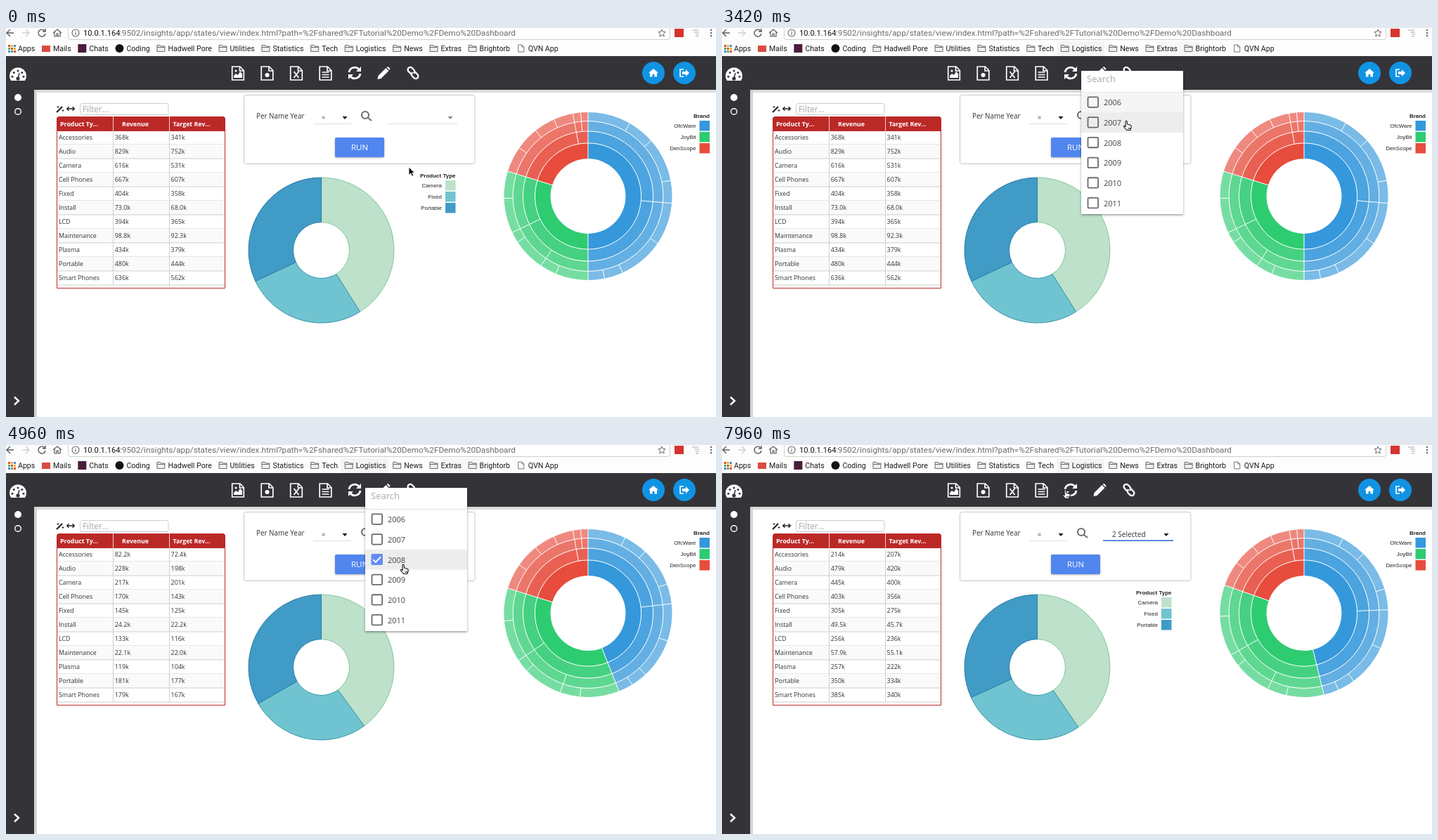
Recreate the animation shown at these times as an HTML page with a canvas. Size 1010 by 554 pixels, loop 8000 ms.

```html
<!DOCTYPE html>
<html lang="en">
<head>
<meta charset="utf-8">
<title>Dashboard filter</title>
<style>
  html, body { margin: 0; width: 100%; height: 100%; overflow: hidden; background: #fff; }
  canvas { display: block; }
</style>
</head>
<body>
<canvas id="stage" width="1010" height="554"></canvas>
<script>
const ctx = document.getElementById('stage').getContext('2d');
const LOOP = 8000, STEP = 150, TAU = Math.PI * 2, DARK = '#343338';
const OPEN = '"Open Sans", sans-serif', ROBOTO = 'Roboto, sans-serif', ARIAL = '"Liberation Sans", sans-serif';

// Moments of the session, in ms
const HOVER_FIELD = 2700, OPENED = 3100, CLOSED = 6850;
const CLICKS = [
  { row: 2, press: 4150, load: 4290, show: 4450 },
  { row: 3, press: 5405, load: 5545, show: 5700 }
];

// Places where the pointer rests
const RESTS = [
  { from: 0, to: 150, x: 573, y: 198 },
  { from: 1070, to: 1200, x: 528, y: 28 },
  { from: 1950, to: 1950, x: 668, y: 30 },
  { from: 2700, to: 3560, x: 574, y: 132 },
  { from: 4050, to: 4950, x: 564, y: 170 },
  { from: 5400, to: 5700, x: 563, y: 192 },
  { from: 6300, to: 6620, x: 607, y: 323 },
  { from: 7500, to: 7650, x: 545, y: 189 },
  { from: 7950, to: LOOP, x: 487, y: 63 }
];

const words = s => s.split(' ');
const PRODUCTS = 'Accessories,Audio,Camera,Cell Phones,Fixed,Install,LCD,Maintenance,Plasma,Portable,Smart Phones'.split(',');
const DATA = [
  {
    revenue: words('368k 829k 616k 667k 404k 73.0k 394k 98.8k 434k 480k 636k'),
    goal: words('341k 752k 531k 607k 358k 68.0k 365k 92.3k 379k 444k 562k'),
    brandEnds: [0.5, 0.798, 1]
  }, {
    revenue: words('82.2k 228k 217k 170k 145k 24.2k 133k 22.1k 119k 181k 179k'),
    goal: words('72.4k 198k 201k 143k 125k 22.2k 116k 22.0k 104k 177k 167k'),
    brandEnds: [0.44, 0.798, 1]
  }, {
    revenue: words('214k 479k 445k 403k 305k 49.5k 256k 57.9k 257k 350k 385k'),
    goal: words('207k 420k 400k 356k 275k 45.7k 236k 55.1k 222k 334k 340k'),
    brandEnds: [0.462, 0.804, 1]
  }
];

const TYPES = [['Camera', '#bde1ca', '#82c69c'], ['Fixed', '#70c4d1', '#3594a8'], ['Portable', '#409bc6', '#2a7ba3']];
// Each brand is cut at these parts of its arc, one list per outer ring
const BRANDS = [
  ['OfcWare', '#3498db', [[0.527], [], [0.165, 0.27, 0.44, 0.69, 0.865, 0.937]]],
  ['JoyBit', '#2ecc71', [[0.6], [0.318], [0.21, 0.53, 0.825]]],
  ['DenScope', '#e74c3c', [[0.857], [0.93], [0.245, 0.47, 0.67]]]
];

function text(s, x, y, font, color, align = 'left') {
  ctx.font = font;
  ctx.fillStyle = color;
  ctx.textAlign = align;
  ctx.fillText(s, x, y);
}
function rect(x, y, w, h, color) {
  ctx.fillStyle = color;
  ctx.fillRect(x, y, w, h);
}
function round(x, y, w, h, r, fill, stroke, width = 1) {
  ctx.beginPath();
  ctx.roundRect(x, y, w, h, r);
  if (fill) { ctx.fillStyle = fill; ctx.fill(); }
  if (stroke) { ctx.strokeStyle = stroke; ctx.lineWidth = width; ctx.stroke(); }
}
function dot(x, y, r, color) {
  ctx.fillStyle = color;
  ctx.beginPath();
  ctx.arc(x, y, r, 0, TAU);
  ctx.fill();
}
// Path placed at x, y: filled, and stroked when a width is given
function icon(x, y, path, fill, stroke, width = 0, turn = 0) {
  const p = new Path2D(path);
  ctx.save();
  ctx.translate(x, y);
  ctx.rotate(turn);
  if (fill) { ctx.fillStyle = fill; ctx.fill(p); }
  if (width) { ctx.strokeStyle = stroke; ctx.lineWidth = width; ctx.stroke(p); }
  ctx.restore();
}
const line = (x, y, path, color, width, turn) => icon(x, y, path, null, color, width, turn);
const shadow = (color, blur, dy) => Object.assign(ctx, { shadowColor: color, shadowBlur: blur, shadowOffsetY: dy });

// Angles of both charts run clockwise from the top, as parts of a turn
const angle = part => (part - 0.25) * TAU;
function sector(cx, cy, r0, r1, from, to) {
  ctx.beginPath();
  ctx.arc(cx, cy, r1, angle(from), angle(to));
  ctx.arc(cx, cy, r0, angle(to), angle(from), true);
  ctx.closePath();
}

function pointerAt(t) {
  const now = Math.floor(t / STEP) * STEP;
  const i = RESTS.findLastIndex(r => r.from <= now);
  const a = RESTS[i], b = RESTS[i + 1] || a;
  const p = Math.max(0, (now - a.to) / (b.from - a.to || 1));
  const eased = a === b ? 0 : p * p * (3 - 2 * p);
  return { x: a.x + (b.x - a.x) * eased, y: a.y + (b.y - a.y) * eased };
}

function bookmarks() {
  const tiles = ['#e04a3f', '#4caf50', '#4285f4', '#f4b400'];
  for (let i = 0; i < 9; i++) rect(3 + i % 3 * 4, 24 + Math.floor(i / 3) * 4, 3, 3, tiles[i * 3 % 4]);
  const folder = x => icon(x, 29, 'M-5.5-4.5H-1L0-3H5.5V4.5H-5.5ZM-5.5-1.5H5.5', '#eee', '#6a6a6a', 1);
  const marks = {
    Apps: () => {},
    Mails: x => rect(x - 6, 25, 12, 9, '#d94b40'),
    Chats: x => rect(x - 6, 23, 12, 12, '#4a1d3a'),
    Coding: x => dot(x, 29, 6, '#111'),
    'Hadwell Pore': folder, Utilities: folder, Statistics: folder, Tech: folder,
    Logistics: folder, News: folder, Extras: folder, Brightorb: folder,
    'QVN App': x => line(x, 29, 'M-4-5H1L4-2V5H-4ZM1-5V-2H4', '#777', 1)
  };
  let x = 17;
  for (const [name, mark] of Object.entries(marks)) {
    mark(x - 10);
    text(name, x, 33, '10.6px ' + ROBOTO, '#1c1c1c');
    x += ctx.measureText(name).width + 25.7;
  }
}

function browserBar(t) {
  rect(0, 0, 1010, 40, '#fdfdfd');
  if (t >= 1070) rect(476, 19, 68, 21, '#f4f4f4');
  if (t >= 1950) rect(620, 19, 60, 21, '#f7f7f7');
  line(6, 7, 'M5 0H-4M0-5L-5 0 0 5', '#5a5a5a', 1.4);
  line(28, 7, 'M-5 0H4M0-5L5 0 0 5', '#d0d0d0', 1.4);
  line(51, 7, 'M4-3A5 5 0 1 0 5 1M5-6V-2H1', '#5a5a5a', 1.4);
  line(73, 7, 'M-6 0L0-5 6 0M-4-1V5H-1V1H1V5H4V-1', '#5a5a5a', 1.2);
  round(88.5, -8, 856, 24.5, 3, '#fff', '#cfcfcf');
  line(99, 7, 'M5 0A5 5 0 1 1-5 0A5 5 0 1 1 5 0M0-1V3M0-3V-2', '#666', 1.1);
  text('10.0.1.164', 110, 11, '11.1px ' + ROBOTO, '#111');
  text(':9502/insights/app/states/view/index.html?path=%2Fshared%2FTutorial%20Demo%2FDemo%20Dashboard',
    162, 11, '11.75px ' + ROBOTO, '#6a6a6a');
  line(933, 7, 'M0-5L1.5-1.6 5-1.3 2.4 1.2 3.2 5 0 3-3.2 5-2.4 1.2-5-1.3-1.5-1.6Z', '#666', 1);
  rect(951, 1, 13, 12, '#d6322f');
  line(981, 7, 'M-5-4H4M-2-1H5M0 2H5M0 5H4', '#aaa', 1);
  for (let y = 3; y < 12; y += 4) dot(1003, y, 1.2, '#666');
  bookmarks();
}

function appFrame() {
  rect(40, 88, 970, 4, '#dcdcdc');
  rect(40, 88, 4, 466, '#d4d4d4');
  rect(0, 40, 1010, 48, DARK);
  rect(0, 40, 40, 514, DARK);
  icon(17, 66, 'M-10 9A12 12 0 1 1 10 9Z', '#fff');
  for (let i = -2; i <= 2; i++) dot(17 + 8 * Math.sin(i * 0.8), 69 - 8 * Math.cos(i * 0.8), 1.5, DARK);
  line(17, 66, 'M0 6L2-2', DARK, 1.6);
  dot(17, 72, 2.6, DARK);
  dot(17, 99, 5, '#fff');
  line(17, 119, 'M4.3 0A4.3 4.3 0 1 1-4.3 0A4.3 4.3 0 1 1 4.3 0', '#fff', 1.4);
  line(15, 531, 'M-3-5.5L3 0-3 5.5', '#fff', 2.4);

  const tool = i => 330 + i * 41.5;
  for (let i = 0; i < 4; i++) line(tool(i), 64.5, 'M-8.3-9.5H3L8.3-4V9.5H-8.3ZM2.5-9.5V-3.5H8.3', '#fff', 1.7);
  icon(tool(0), 64, 'M-6 7V4L-3 1 0 3 3-2 6 1V7Z', '#fff');
  dot(tool(0) - 3, 61, 1.6, '#fff');
  dot(tool(1), 67, 3, '#fff');
  line(tool(2), 64, 'M-3.5-2L3.5 7M3.5-2L-3.5 7', '#fff', 1.8);
  line(tool(3), 64, 'M-5-1H5M-5 2.5H5M-5 6H5', '#fff', 1.6);
  line(tool(4), 64, 'M-8-1A8 8 0 0 1 6-5M8 1A8 8 0 0 1-6 5', '#fff', 2.8);
  icon(tool(4), 64, 'M9-9V-2H2ZM-9 9V2H-2Z', '#fff');
  icon(tool(5), 64, 'M-9 9L-8 4 3-7 7-3-4 8ZM4-8L6-9 9-6 8-4Z', '#fff');
  line(tool(6), 64, 'M1 3H-6A3.5 3.5 0 0 1-6-4H-2A3.5 3.5 0 0 1 1 0M-1-3H6A3.5 3.5 0 0 1 6 4H2A3.5 3.5 0 0 1-1 0', '#fff', 2.3, Math.PI / 4);
  dot(921, 64, 16, '#1193e4');
  dot(965, 64, 16, '#1193e4');
  icon(921, 64, 'M-7 0L0-6 7 0H5V5.5H1.5V2H-1.5V5.5H-5V0Z', '#fff');
  line(965, 64, 'M-1-5H-6V5H-1', '#fff', 1.7);
  icon(965, 64, 'M-3-2H2V-5L7 0 2 5V2H-3Z', '#fff');
}

function prompt(t) {
  const active = t >= HOVER_FIELD;
  round(338.5, 95.5, 328.5, 98, 3, '#fff', '#c8c8c8');
  text('Per Name Year', 356, 129, '9.9px ' + OPEN, '#333');
  text('=', 449, 131, '9px ' + OPEN, '#222');
  rect(437, 136, 54, 1, '#ddd');
  icon(482, 128, 'M-3.5-2H3.5L0 2Z', '#111');
  line(512, 124, 'M4 0A5 5 0 1 1-6 0A5 5 0 1 1 4 0M3 4L8 8', '#707070', 2.2);
  rect(542, active ? 135.3 : 136, 100, active ? 1.7 : 1, active ? '#3f74d6' : '#e0e0e0');
  icon(632, 128, 'M-3.5-2H3.5L0 2Z', active ? '#111' : '#8a8a8a');
  if (t >= CLICKS[1].show) text('2 Selected', 555, 131, '10px ' + OPEN, '#333');
  shadow('rgba(0,0,0,.3)', 3, 1);
  round(468, 156, 70, 28, 2, '#5186ef');
  shadow('transparent', 0, 0);
  text('RUN', 503, 174, '11.5px ' + OPEN, '#fff', 'center');
}

function table(data) {
  line(77, 115, 'M-5 5L3-3', '#222', 2.2);
  line(77, 115, 'M-3-4V-1M-4.5-2.5H-1.5M4 1V4M2.5 2.5H5.5', '#333', 1);
  line(92, 115, 'M-5 0H5M-2.5-2.8L-5.3 0-2.5 2.8M2.5-2.8L5.3 0 2.5 2.8', '#222', 1.4);
  round(105.5, 107.5, 125.5, 16, 3, '#fff', '#ccc');
  text('Filter...', 109, 120, '11.8px ' + OPEN, '#a8a8a8');
  PRODUCTS.forEach((product, i) => {
    const bottom = 166 + i * 20;
    if (i % 2) rect(72, bottom - 20, 240, 20, '#fafafa');
    rect(72, bottom - 0.5, 240, 1, '#cfcfcf');
    [product, data.revenue[i], data.goal[i]].forEach((s, c) =>
      text(s, 75 + c * 79.8, bottom - 7, '8.9px ' + OPEN, '#333'));
  });
  round(72.5, 126.5, 239, 244, [4, 4, 0, 0], null, '#bf2b2a');
  round(72, 126, 240, 21, [4, 4, 0, 0], '#bb2927');
  for (const x of [152, 232]) {
    rect(x, 147, 1, 219, '#cfcfcf');
    rect(x, 126, 1, 21, '#f0d0d0');
  }
  const head = (s, x) => text(s, x, 139.5, 'bold 8.8px ' + OPEN, '#fff', 'center');
  head('Product Ty...', 104);
  head('Revenue', 184);
  head('Target Rev...', 264);
}

function legend(title, items, right, top) {
  text(title, right, top, 'bold 8px ' + ARIAL, '#222', 'right');
  items.forEach(([name, color], i) => {
    rect(right - 14.5, top + 4 + i * 16, 14.5, 14.5, color);
    text(name, right - 19.5, top + 14 + i * 16, '8px ' + ARIAL, '#222', 'right');
  });
}

function donut(data, grow) {
  const values = TYPES.map(([name]) => parseFloat(data.revenue[PRODUCTS.indexOf(name)]));
  const total = values.reduce((a, b) => a + b);
  const hole = 40 * Math.max(0, (grow - 0.38) / 0.62);
  let from = 0;
  TYPES.forEach(([, fill, stroke], i) => {
    const to = from + values[i] / total;
    sector(448.5, 316.5, hole, 103.5 * grow, from, to);
    ctx.fillStyle = fill;
    ctx.fill();
    ctx.strokeStyle = stroke;
    ctx.lineWidth = 1;
    ctx.stroke();
    from = to;
  });
  legend('Product Type', TYPES, 639.5, 213);
}

function sunburst({ brandEnds }) {
  const cx = 828, cy = 239.5, radius = k => 119.5 * Math.sqrt((k + 1) / 5);
  const cut = (part, ring) => {
    const c = Math.cos(angle(part)), s = Math.sin(angle(part));
    ctx.moveTo(cx + c * radius(ring), cy + s * radius(ring));
    ctx.lineTo(cx + c * radius(4), cy + s * radius(4));
  };
  const start = b => b ? brandEnds[b - 1] : 0;
  BRANDS.forEach(([, color], b) => {
    ctx.fillStyle = color;
    for (let ring = 0; ring < 4; ring++) {
      sector(cx, cy, radius(ring), radius(ring + 1), start(b), brandEnds[b]);
      ctx.globalAlpha = 1 - 0.115 * ring;
      ctx.fill();
    }
  });
  ctx.globalAlpha = 1;
  ctx.beginPath();
  for (let ring = 1; ring < 4; ring++) {
    ctx.moveTo(cx + radius(ring), cy);
    ctx.arc(cx, cy, radius(ring), 0, TAU);
  }
  BRANDS.forEach(([, , rings], b) => {
    cut(start(b), 0);
    rings.forEach((parts, k) => parts.forEach(p => cut(start(b) + p * (brandEnds[b] - start(b)), k + 1)));
  });
  ctx.strokeStyle = '#fff';
  ctx.lineWidth = 1;
  ctx.stroke();
  legend('Brand', BRANDS, 1001, 128);
}

function spinner(x, y) {
  ctx.beginPath();
  ctx.arc(x, y, 14, angle(0.05), angle(1));
  ctx.strokeStyle = '#2dc95c';
  ctx.lineWidth = 4.4;
  ctx.stroke();
}

function dropdown(t, at) {
  const top = 91.5, height = 28.7;
  const last = CLICKS.findLast(c => t >= c.press);
  const pressed = last && t < (last.row === 2 ? last.load : last.show) ? last.row : -1;
  const hover = last ? last.row : Math.floor((at.y + 4 - top) / height);
  ctx.globalAlpha = t < OPENED + STEP || t > CLOSED - STEP ? 0.6 : 1;
  shadow('rgba(0,0,0,.4)', 3, 1.5);
  rect(511, 61, 145, 204, '#fff');
  shadow('transparent', 0, 0);
  text('Search', 519, 77, '13px ' + OPEN, '#a9a9a9');
  rect(511, 91, 145, 1, '#e0e0e0');
  for (let i = 0; i < 6; i++) {
    const y = top + i * height, mid = y + height / 2;
    const on = CLICKS.some(c => c.row === i && t >= c.load);
    if (i === 0 && t < CLICKS[0].load) rect(511, y, 145, height, '#f5f5f5');
    if (i === hover) rect(511, y, 145, height, i === pressed ? '#d4d4d4' : '#ededed');
    ctx.save();
    if (i === pressed) {
      ctx.beginPath();
      ctx.rect(511, y, 145, height);
      ctx.clip();
      dot(at.x + 1.5, mid + 4, on ? 48 : 26, on ? '#bfbfbf' : '#c9c9c9');
      if (on) ctx.globalAlpha = 0.45;
    }
    if (on) {
      round(519.5, mid - 8.2, 16.5, 16, 2, '#638df2');
      line(527.7, mid, 'M-5.5 0L-2 3.7 5.5-4', '#fff', 1.8);
    } else round(520.5, mid - 7.4, 14.6, 14.4, 1.5, null, '#6a6a6a', 1.8);
    ctx.restore();
    text(2006 + i, 543, mid + 4.3, '11px ' + OPEN, '#444');
  }
  ctx.globalAlpha = 1;
}

function pointer(t, { x, y }) {
  ctx.lineJoin = 'round';
  if (t >= HOVER_FIELD && t < 5850 || t >= 7900)
    icon(x - 3, y, 'M3 1Q4.2-.4 5.2 1L5.5 5 10 6.2Q11.5 6.8 11.2 9L10 13.5H4.5L.8 9Q0 7.3 1.5 7.2L3.3 8.6ZM7 10V12M9 10V12', '#fff', '#111', 1.1);
  else
    icon(x, y, 'M0 0V11.5L2.7 9 4.6 13.2 6.6 12.3 4.8 8.3H8.4Z', '#111', '#fff', 0.8);
  ctx.lineJoin = 'miter';
}

function draw(t) {
  const at = pointerAt(t);
  rect(0, 0, 1010, 554, '#fff');
  browserBar(t);
  appFrame();
  prompt(t);
  if (CLICKS.some(c => t >= c.load && t < c.show)) {
    spinner(88.5, 124);
    spinner(353.5, 222);
    spinner(725, 136.5);
  } else {
    const index = CLICKS.filter(c => t >= c.show).length;
    const steps = index ? Math.floor((t - CLICKS[index - 1].show) / 170) : 2;
    table(DATA[index]);
    donut(DATA[index], Math.min(1, 0.42 + steps * 0.38));
    sunburst(DATA[index]);
  }
  if (t >= OPENED && t < CLOSED) dropdown(t, at);
  pointer(t, at);
}

function tick() {
  draw(performance.now() % LOOP);
  requestAnimationFrame(tick);
}
tick();
</script>
</body>
</html>
```
